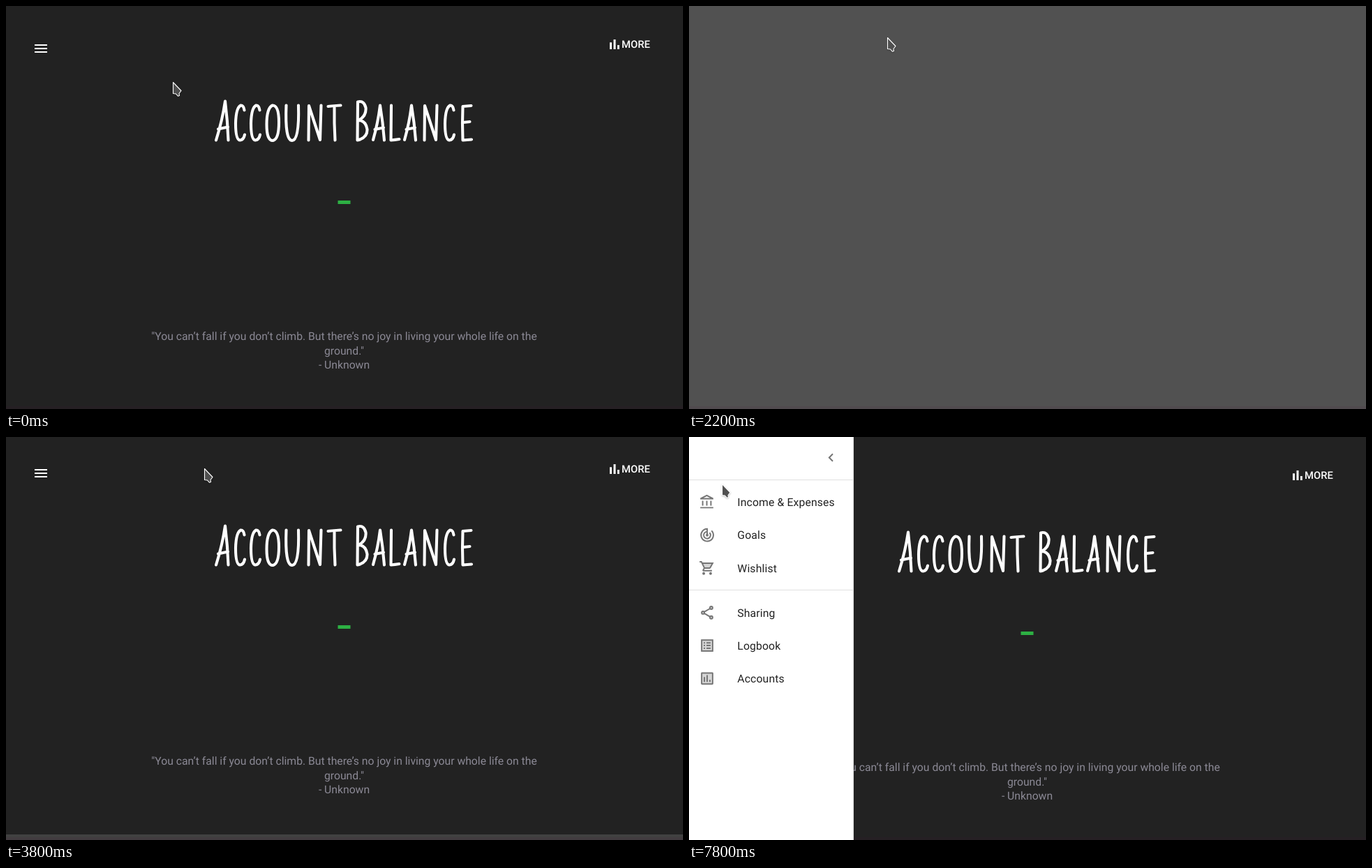
These frames come from a looping animation (970x578 px, 8 s). An HTML page:

```html
<!DOCTYPE html>
<html lang="en">
<head>
<meta charset="utf-8">
<title>Account Balance</title>
<style>
html, body { margin: 0; width: 100%; height: 100%; overflow: hidden; background: #515151; }
svg { display: block; }
text { font-family: Roboto, sans-serif; text-rendering: geometricPrecision; white-space: pre; }

.page, .menu, .drawer, .cursor, .arrow, .hand { animation: 8s step-end infinite; }
.page { animation-name: scroll; }
.menu { animation-name: menu; filter: drop-shadow(0 2px 2px rgba(0,0,0,.3)); }
.drawer { animation-name: drawer; }
.cursor { animation-name: move; filter: drop-shadow(0 1px 1px rgba(0,0,0,.25)); }
.arrow { animation-name: arrow; }
.hand { animation-name: hand; }

.quote { font-size: 15.73px; fill: #8b8995; text-anchor: middle; }
.more { font-size: 14.75px; font-weight: 500; letter-spacing: .1px; fill: #fff; }
.menu text { font-size: 15px; font-weight: 500; fill: rgba(0,0,0,.87); }
.drawer text { font-size: 15.73px; letter-spacing: .15px; fill: rgba(0,0,0,.87); }
.title { fill: none; stroke: #fff; stroke-width: 4.1; stroke-linecap: round; stroke-linejoin: round; }
.icon { fill: none; stroke: #757575; stroke-width: 2; }
.icon .solid { fill: #757575; stroke: none; }
.icon .tint { fill: #757575; fill-opacity: .3; }
.cursor path { fill: #505050; stroke: #fff; stroke-width: 1.1; stroke-linejoin: round; }

@keyframes scroll {
  0% { transform: translateY(0); }
  6.25% { transform: translateY(-30px); }
  7.5% { transform: translateY(-110px); }
  8.75% { transform: translateY(-200px); }
  10% { transform: translateY(-290px); }
  11.25% { transform: translateY(-365px); }
  12.5% { transform: translateY(-407px); }
  20% { transform: translateY(-560px); }
  21.25% { transform: translateY(-860px); }
  22.5% { transform: translateY(-1157px); }
  31.25% { transform: translateY(-976px); }
  33.75% { transform: translateY(-860px); }
  35% { transform: translateY(-752px); }
  38.75% { transform: translateY(-657px); }
  41.25% { transform: translateY(-552px); }
  46.25% { transform: translateY(-230px); }
  47.5% { transform: translateY(-9px); }
  51.25% { transform: translateY(-3px); }
  52.5%, 100% { transform: translateY(0); }
}
@keyframes move {
  0% { transform: translate(239px, 109px); }
  7.5% { transform: translate(245px, 103px); }
  8.75% { transform: translate(251px, 95px); }
  10% { transform: translate(258px, 86px); }
  11.25% { transform: translate(262px, 80px); }
  12.5% { transform: translate(264px, 77px); }
  20% { transform: translate(270px, 67px); }
  21.25% { transform: translate(278px, 55px); }
  22.5% { transform: translate(284px, 46px); }
  27.5% { transform: translate(284px, 45px); }
  52.5% { transform: translate(297px, 44px); }
  55% { transform: translate(617px, 72px); }
  57.5% { transform: translate(800px, 69px); }
  58.75% { transform: translate(957px, 65px); }
  61.25% { transform: translate(899px, 56px); }
  70% { transform: translate(872px, 78px); }
  72.5% { transform: translate(924px, 52px); }
  75% { transform: translate(870px, 46px); }
  76.25% { transform: translate(764px, 40px); }
  81.25% { transform: translate(388px, 49px); }
  83.75% { transform: translate(225px, 70px); }
  85% { transform: translate(63px, 89px); }
  87.5% { transform: translate(54px, 79px); }
  88.75% { transform: translate(45px, 69px); }
  91.25%, 100% { transform: translate(47px, 67px); }
}
@keyframes arrow {
  0%, 75%, 91.25%, 100% { opacity: 1; }
  61.25%, 87.5% { opacity: 0; }
}
@keyframes hand {
  0%, 75%, 91.25%, 100% { opacity: 0; }
  61.25%, 87.5% { opacity: 1; }
}
@keyframes menu {
  0%, 83.75%, 100% { opacity: 0; }
  66.25% { opacity: .4; }
  67.5% { opacity: .9; }
  70% { opacity: 1; }
  81.25% { opacity: .215; }
}
@keyframes drawer {
  0% { transform: translateX(-240px); }
  91.25% { transform: translateX(-195px); }
  92.5% { transform: translateX(-134px); }
  95% { transform: translateX(-2px); }
  97.5%, 100% { transform: translateX(0); }
}
</style>
</head>
<body>
<svg width="970" height="578" viewBox="0 0 970 578">
  <defs>
    <path id="a" d="M2 51.500Q9 27 12 2Q16 26 18 52M4.500 36.500L17 34"/>
    <path id="c" d="M14.500 9Q13.500 2 9.500 2Q2.500 5 2 28Q2 52 8.500 52Q13.500 51.500 15 44"/>
    <path id="n" d="M2.500 52L3 2.500L19 51.500L20.500 2"/>
  </defs>

  <g class="page">
    <rect width="970" height="579" fill="#222"/>
    <rect y="579" width="970" height="578" fill="#414141"/>
    <rect y="1157" width="970" height="600" fill="#515151"/>

    <path d="M41 55h18v2h-18zm0 5h18v2h-18zm0 5h18v2h-18z" fill="#fff"/>
    <path d="M865 52.200h3v9.800h-3zM870.500 48h3v14h-3zM876 56h2.800v6h-2.800z" fill="#fff"/>
    <text class="more" x="882" y="60">MORE</text>

    <g class="title" role="img" aria-label="Account Balance">
      <path d="M301 192.500Q310 164 314 136.500Q317.500 165 318.500 192.500M304 176.500L318 173.500"/>
      <use href="#c" x="327" y="140.500"/>
      <use href="#c" x="349" y="140.500"/>
      <path d="M382 142.500Q373.500 146 373.500 170Q373.500 193.500 382.500 193Q391 191 391 167Q391 142.500 382 142.500Z"/>
      <path d="M401.500 142.500Q399.500 193 410 193Q420.500 192.500 419 142.500"/>
      <use href="#n" x="431" y="140.500"/>
      <path d="M461.500 144Q470 143 479.500 142.500M470.500 144Q470 168 471.500 192.500"/>
      <path d="M504 137.500L503.500 192.500Q518 189 517.500 177Q515.500 164 505 164Q516.500 158 515.500 146Q513 135 504 137.500"/>
      <use href="#a" x="524" y="140.500"/>
      <path d="M552 142.500L551.500 192.500Q557 192 563.500 191"/>
      <use href="#a" x="569" y="140.500"/>
      <use href="#n" x="597" y="140.500"/>
      <use href="#c" x="627" y="140.500"/>
      <path d="M666.500 143L654.500 144Q653.500 168 654.500 192.500L667 191.500M655 167L664.500 166"/>
    </g>
    <rect x="475.500" y="279" width="18" height="5" fill="#2db043"/>

    <g class="quote">
      <text x="484.500" y="479">"You can’t fall if you don’t climb. But there’s no joy in living your whole life on the</text>
      <text x="484.500" y="499.700">ground."</text>
      <text x="484.500" y="520">- Unknown</text>
    </g>
  </g>

  <rect y="574" width="970" height="4" fill="rgba(90,10,55,.07)"/>

  <g class="menu">
    <rect x="864" y="32" width="85" height="77.500" rx="4" fill="#fff"/>
    <text x="878" y="60.300">Settings</text>
    <text x="878" y="92.300">Logout</text>
  </g>

  <g class="drawer">
    <rect width="236" height="578" fill="#fff"/>
    <path d="M0 61h235v1H0zM0 219h235v1H0zM235 0h1v578h-1z" fill="#e0e0e0"/>
    <g class="icon" transform="translate(191.600 17.700) scale(.983)"><path d="M14.700 6.700L9.400 12l5.300 5.300"/></g>

    <g class="icon" transform="translate(14.200 81.700) scale(.983)">
      <path class="solid" d="M4.500 10h2v7h-2zM10.500 10h2v7h-2zM16.500 10h2v7h-2zM2 19h19v2H2z"/>
      <path d="M3 7h17v-.400L11.500 2.100 3 6.600z"/>
    </g>
    <g class="icon" transform="translate(14.200 128.900) scale(.983)">
      <path d="M18.400 5.600A9 9 0 1 1 12 3V12M15.500 8.500A5 5 0 1 1 11 7.100"/>
      <circle class="solid" cx="12" cy="12" r="2"/>
    </g>
    <g class="icon" transform="translate(14.200 176.100) scale(.983)">
      <path class="tint" stroke="none" d="M5.700 5H20l-3.600 6.500Q16 12 15.500 12H8z"/>
      <path d="M1 3h2.700L8 12 6.200 15Q6 16 7 16H19M5 5H20L16.400 11.500Q16 12 15.500 12H8"/>
      <circle class="solid" cx="7" cy="20" r="2"/>
      <circle class="solid" cx="17" cy="20" r="2"/>
    </g>
    <g class="icon" transform="translate(14.200 240.100) scale(.983)">
      <path d="M16.300 6L7.700 11M7.700 13l8.600 5"/>
      <circle class="tint" cx="18" cy="5" r="2"/>
      <circle class="tint" cx="6" cy="12" r="2"/>
      <circle class="tint" cx="18" cy="19" r="2"/>
    </g>
    <g class="icon" transform="translate(14.200 287.300) scale(.983)">
      <rect class="tint" x="4" y="4" width="16" height="16"/>
      <path d="M7 8h2m2 0h6M7 12h2m2 0h6M7 16h2m2 0h6"/>
    </g>
    <g class="icon" transform="translate(14.200 334.500) scale(.983)">
      <rect class="tint" x="4" y="4" width="16" height="16" rx=".5"/>
      <path d="M8 10v7M12 7v10M16 14v3"/>
    </g>

    <text x="69.300" y="99.200">Income &amp; Expenses</text>
    <text x="69.300" y="146.400">Goals</text>
    <text x="69.300" y="193.600">Wishlist</text>
    <text x="69.300" y="257.600">Sharing</text>
    <text x="69.300" y="304.800">Logbook</text>
    <text x="69.300" y="352">Accounts</text>
  </g>

  <g class="cursor">
    <path class="arrow" d="M.500 .500V16.500L4.500 17 7.500 20.300 9.500 19.500 9 16.500 12 12.500Z"/>
    <path class="hand" d="M-1.500 2.500Q-1.500 -1 2 .500L5 7Q7 5.500 8.500 7.500Q10.500 7 11.500 9Q13.500 9.500 13.500 11L12.500 19.500 5 21 .500 18.500 -5.500 14Q-5.500 11 -2.500 11.500L1.500 12.500Z"/>
  </g>
</svg>
</body>
</html>
```
